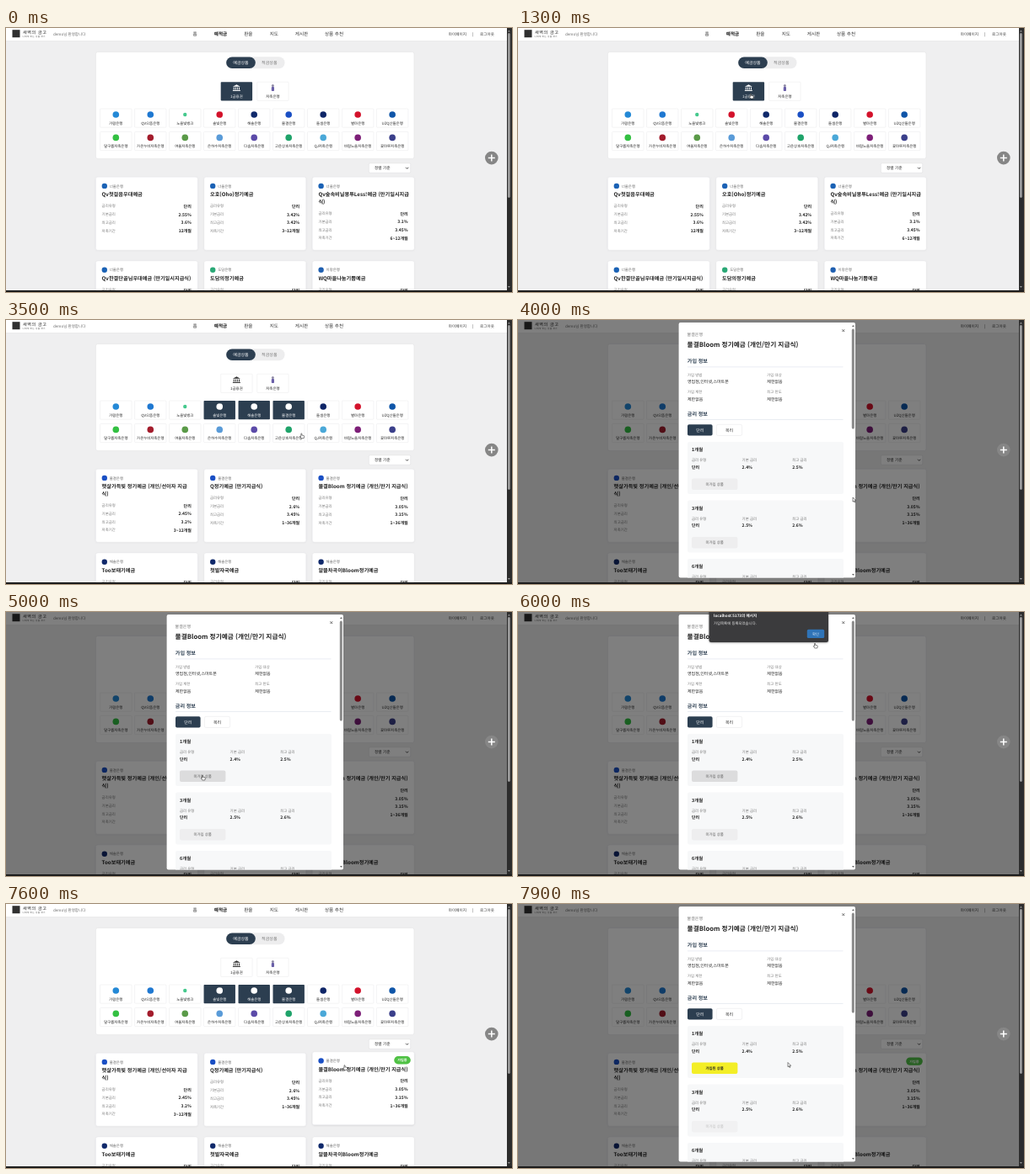
Write an HTML page that moves like this. It is 600x314 px and loops after 8 s.

```html
<!DOCTYPE html>
<html lang="ko">
<head>
<meta charset="utf-8">
<title>예적금 비교</title>
<style>
  html, body { margin: 0; width: 100%; height: 100%; overflow: hidden; background: #efeff0; }
  svg { display: block; width: 100vw; height: 100vh; }
  text {
    font-family: "Noto Sans CJK KR", "Noto Sans KR", "Noto Sans", sans-serif;
    white-space: pre; text-rendering: geometricPrecision;
  }
</style>
</head>
<body>
<svg id="stage" viewBox="0 0 600 314"></svg>
<script>
const LOOP = 8000, TICK = 100;
const NAVY = '#2c3e50', INK = '#222', GREY = '#777', LINE = '#e3e4e6';

// name, icon colour
const BANKS = [
  ['가람은행', '#2489d6'], ['QV으뜸은행', '#1f78d1'], ['노을빛뱅크', '#45c98d'],
  ['솔빛은행', '#d3122b'], ['해솔은행', '#10296b'], ['물결은행', '#1a4fc4'],
  ['들샘은행', '#0e2567'], ['별마은행', '#d3122b'], ['UZQ산들은행', '#0f55a8'],
  ['달구름저축은행', '#33c042'], ['가온누비저축은행', '#a31c2c'], ['여울저축은행', '#5a9a48'],
  ['은하수저축은행', '#5a9bd8'], ['다솜저축은행', '#5b4aa8'], ['고운상호저축은행', '#1fa36a'],
  ['QJ저축은행', '#4aa8d8'], ['바람노을저축은행', '#7d1f78'], ['꽃마루저축은행', '#3a3f8a']
];
const SOL = BANKS[3], HAE = BANKS[4], MUL = BANKS[5];
const NEO = ['너울은행', '#1b62b5'], DO = ['도담은행', '#2aa876'], IR = ['이랑은행', '#1f5fb0'];

// bank, title lines, base rate, top rate, term
const ALL = [
  [NEO, ['Qv첫걸음우대예금'], '2.55%', '3.6%', '12개월'],
  [NEO, ['오호(Oho)정기예금'], '3.42%', '3.42%', '3~12개월'],
  [NEO, ['Qv숲속비닐봉투Less!예금 (만기일시지급', '식)'], '3.1%', '3.45%', '6~12개월'],
  [NEO, ['Qv한결단골님우대예금 (만기일시지급식)'], '2.5%', '2.8%', '1~36개월'],
  [DO, ['도담의정기예금'], '2.6%', '3.4%', '1~36개월'],
  [IR, ['WQ마을나눔기쁨예금'], '2.6%', '3.5%', '12개월']
];
const SOL_CARDS = [
  [SOL, ['또(Too) 차오름 정기예금'], '3.15%', '3.35%', '6~12개월'],
  [SOL, ['또(Too) 알찬 정기예금'], '3%', '3.45%', '1~36개월'],
  [SOL, ['GLOW정기예금'], '2.75%', '3.2%', '1~36개월']
];
const HAE_CARDS = [
  [HAE, ['Too보태기예금'], '2.6%', '3.25%', '3~12개월'],
  [HAE, ['첫발자국예금'], '2.8%', '3.3%', '12개월'],
  [HAE, ['알뜰차곡이Bloom정기예금'], '2.75%', '3.4%', '1~36개월']
];
const MUL_CARDS = [
  [MUL, ['햇살가득빛 정기예금 (개인/선이자 지급', '식)'], '2.45%', '3.2%', '3~12개월'],
  [MUL, ['Q정기예금 (만기지급식)'], '2.6%', '3.45%', '1~36개월'],
  [MUL, ['물결Bloom 정기예금 (개인/만기 지급식)'], '3.05%', '3.15%', '1~36개월']
];

// start, selected bank indexes, cards, page scroll thumb length
const FILTERS = [
  [0, [], ALL, 196],
  [2000, [3], SOL_CARDS, 293],
  [2800, [3, 4], [...HAE_CARDS, ...SOL_CARDS], 196],
  [3300, [3, 4, 5], [...MUL_CARDS, ...HAE_CARDS], 196]
];

// time, x, y, hand pointer
const CURSOR = [
  [0, 612, 214], [100, 592, 210], [500, 440, 190], [900, 330, 120], [1300, 276, 78, 1],
  [1600, 276, 78, 1], [1800, 252, 106, 1], [2500, 252, 106, 1], [2600, 293.5, 111, 1],
  [3000, 293.5, 110, 1], [3200, 334, 106, 1], [3400, 334, 108, 1], [3700, 397, 211, 1],
  [4000, 397, 211], [4700, 233, 194, 1], [5900, 233, 194, 1], [6000, 352, 37, 1],
  [6300, 352, 37, 1], [6400, 356, 42], [6800, 407, 77.5], [6900, 407, 77.5],
  [7200, 416, 120], [7300, 416, 120], [7500, 404, 180, 1], [7600, 401.5, 191.5, 1],
  [7700, 401, 192], [7900, 320, 188.5], [8000, 320, 188.5]
];

const between = (t, a, b) => t >= a && t < b;
const rect = (x, y, w, h, fill, r = 0, extra = '') =>
  `<rect x="${x}" y="${y}" width="${w}" height="${h}" rx="${r}" fill="${fill}" ${extra}/>`;
const dot = (x, y, r, fill) => `<circle cx="${x}" cy="${y}" r="${r}" fill="${fill}"/>`;
const path = (d, fill, extra = '') => `<path d="${d}" fill="${fill}" ${extra}/>`;
const line = (d, color, w) => path(d, 'none', `stroke="${color}" stroke-width="${w}"`);
const border = (color, w = 0.4) => `stroke="${color}" stroke-width="${w}"`;
const move = (x, y, s) => `<g transform="translate(${x} ${y})">${s}</g>`;

// y is the optical middle of the line
const text = (s, x, y, size, fill = INK, weight = 400, anchor = 'start', extra = '') =>
  `<text x="${x}" y="${y + size * 0.37}" font-size="${size}" fill="${fill}" font-weight="${weight}" text-anchor="${anchor}" ${extra}>${s}</text>`;
const mid = (s, x, y, size, fill, weight) => text(s, x, y, size, fill, weight, 'middle');

function header() {
  const nav = [['홈', 224], ['예적금', 254.5], ['환율', 287.3], ['지도', 317.8], ['게시판', 350.5], ['상품 추천', 389]];
  return rect(0, 0, 594, 15.5, '#fff') + rect(0, 15.3, 594, 0.5, '#dedee0') +
    rect(7.5, 2.2, 9, 9, '#303030') +
    text('새벽의 금고', 20, 5.4, 5.1, INK, 500, 'start', 'letter-spacing=".6"') +
    text('나에게 맞는 상품 찾기', 19.5, 10, 2.6, '#555', 400, 'start', 'letter-spacing=".3"') +
    text('demo님 환영합니다', 56, 7.3, 4.5, '#666') +
    nav.map(([s, x], i) => mid(s, x, 7.2, 5.6, i === 1 ? '#111' : '#333', i === 1 ? 700 : 400)).join('') +
    text('마이페이지', 524.8, 7.3, 4.6, '#333') + text('|', 553, 7, 4.6, '#333') +
    text('로그아웃', 562, 7.3, 4.6, '#333');
}

function bankHouse(fill) {
  const cols = [-3.3, -1.2, 0.9, 3].map(x => rect(x - 0.4, -0.7, 1, 2.9, fill)).join('');
  return path('M-4.5-1.4 0-4 4.5-1.4z', fill) + cols + rect(-4.5, 2.6, 9, 1.1, fill);
}

const saver = dot(0, -2.7, 1.5, '#8f8aa6') + rect(-1.6, -1.1, 3.2, 4.9, '#6a5fa8', 0.8);

function button(x, y, label, icon, on) {
  return rect(x, y, 37.4, 22.2, on ? NAVY : '#fff', 0.8, on ? '' : border(LINE)) +
    move(x + 18.7, y + 7, icon) +
    mid(label, x + 18.7, y + 16.9, 4.4, on ? '#fff' : INK, 500);
}

function filterPanel(firstTier, chosen) {
  let s = rect(106.4, 28.4, 377.6, 127.2, '#fff', 2.5, border('#e2e2e4', 0.6));
  s += rect(261, 34.3, 69.5, 14, '#ededee', 7) + rect(261.2, 34.5, 34.6, 13.6, NAVY, 6.8);
  s += mid('예금상품', 278.5, 41.4, 5, '#fff', 500) + mid('적금상품', 312.3, 41.4, 5, GREY);
  s += button(254.7, 64.2, '1금융권', bankHouse(firstTier ? '#fff' : '#333'), firstTier);
  s += button(297.7, 64.2, '저축은행', saver, false);
  BANKS.forEach(([name, color], i) => {
    const on = chosen.includes(i);
    const x = 111.6 + (i % 9) * 40.98, y = i < 9 ? 96 : 123.4;
    s += button(x, y, name, dot(0, 0, i === 2 ? 2.2 : 3.8, on ? '#fff' : color), on);
  });
  s += rect(430.3, 160.8, 49.4, 11.5, '#fff', 1.5, border('#d4d4d6'));
  return s + text('정렬 기준', 437, 166.5, 4.7, INK) + line('M474 165.8l1.6 1.6 1.6-1.6', '#222', 0.8);
}

function card([bank, title, base, top, term], x, y, h, lift, joined) {
  const shift = (title.length - 1) * 8.8, gap = 9.8;
  let s = rect(0.1, 0.6, 121, h, lift ? '#d2d2d5' : '#e0e0e2', 2.8, 'filter="url(#soft)"') +
    rect(0, 0, 121, h, '#fff', 2.5, border('#e6e6e8'));
  s += dot(10.4, 10.7, 3.2, bank[1]) + text(bank[0], 16.4, 10.7, 4.4, '#666');
  title.forEach((row, i) => { s += text(row, 7.2, 20.9 + i * 8.8, 6.2, INK, 700); });
  [['금리유형', '단리'], ['기본금리', base], ['최고금리', top], ['저축기간', term]].forEach(([k, v], i) => {
    const cy = 34.4 + shift + i * gap;
    s += text(k, 7.2, cy, 4.4, GREY) + text(v, 113.4, cy + 0.3, 5, INK, 700, 'end');
  });
  if (joined) s += rect(97, 5.2, 19.6, 9.4, '#4fc144', 4.7) + mid('가입중', 106.8, 9.9, 4.1, '#fff', 700);
  return move(x, y - lift, s);
}

function page(t) {
  const [, chosen, cards] = FILTERS.findLast(f => t >= f[0]);
  const lift = t === 7500 ? 0.8 : between(t, 7600, 7700) || between(t, 3700, 4000) ? 1.4 : 0;
  const first = cards.slice(0, 3);
  const h = first.some(c => c[1].length > 1) ? 87 : 78;
  let s = rect(0, 0, 600, 314, '#efeff0') + header() + filterPanel(t < 1400, chosen);
  cards.forEach((c, i) => {
    const third = i === 2;
    s += card(c, 106.4 + (i % 3) * 128.4, i < 3 ? 177.2 : 190 + h, h, third ? lift : 0, third && t >= 6300);
  });
  return s;
}

function term(label, y, base, top, state) {
  const looks = {
    plain: ['#eeeeef', '#555', 400, '미가입 상품'],
    hover: ['#dcdcdd', '#555', 400, '미가입 상품'],
    off: ['#f1f1f2', '#bdbdbd', 400, '미가입 상품'],
    done: ['#f3ee27', '#222', 700, '가입된 상품']
  };
  const [bg, ink, weight, caption] = looks[state];
  let s = rect(0, 0, 185, 62, '#f7f8f9', 2) + text(label, 5, 9.4, 5.4, INK, 700);
  [['금리 유형', '단리'], ['기본 금리', base], ['최고 금리', top]].forEach(([k, v], i) => {
    s += text(k, 5 + i * 59.6, 21.5, 4.4, GREY) + text(v, 5 + i * 59.6, 30, 5, INK, 700);
  });
  s += rect(5, 43.5, 54.4, 13.6, bg, 2) + mid(caption, 32.2, 50.3, 4.4, ink, weight);
  return move(201, y, s);
}

function modal(t) {
  const joined = t >= 6300;
  const info = [['가입 방법', '영업점,인터넷,스마트폰', 201, 65], ['가입 대상', '제한없음', 295.3, 65],
    ['가입 제한', '제한없음', 201, 85.5], ['최고 한도', '제한없음', 295.3, 85.5]];
  let s = rect(0, 0, 594, 312, 'rgba(0,0,0,.5)') + rect(190.6, 3, 209.4, 303.4, '#fff', 2);
  s += '<g clip-path="url(#sheet)">';
  s += text('물결은행', 200.6, 17, 5, GREY) + line('M384.4 11.2l2.8 2.8m0-2.8l-2.8 2.8', '#333', 0.7);
  s += text('물결Bloom 정기예금 (개인/만기 지급식)', 200.6, 29.2, 7.7, INK, 700);
  s += text('가입 정보', 200.8, 49, 6.1, NAVY, 700) + rect(201, 55.6, 184.5, 0.6, '#dbe2ea');
  info.forEach(([k, v, x, y]) => { s += text(k, x, y, 4.4, GREY) + text(v, x, y + 8.4, 5, INK, 500); });
  s += text('금리 정보', 200.8, 112, 6.1, NAVY, 700) + rect(201, 118, 184.5, 0.6, '#dbe2ea');
  s += rect(201, 124.3, 29.6, 13.2, NAVY, 1.8) + mid('단리', 215.8, 130.9, 5, '#fff', 500);
  s += rect(235.4, 124.3, 30.2, 13.2, '#fff', 1.8, border('#dedee0')) + mid('복리', 250.6, 130.9, 5, '#333', 500);
  s += term('1개월', 145, '2.4%', '2.5%', joined ? 'done' : between(t, 4700, 6300) ? 'hover' : 'plain');
  s += term('3개월', 214.5, '2.5%', '2.6%', joined ? 'off' : 'plain');
  s += term('6개월', 284, '2.6%', '2.7%', 'plain') + '</g>';
  return s + rect(395.8, 10.4, 3, 119, '#8a8a8a', 1.5) +
    path('M396 8l1.4-2 1.4 2z', '#666') + path('M396 302l1.4 2 1.4-2z', '#666');
}

function alertBox() {
  return rect(226.6, -4, 141.4, 40.4, '#222', 3, 'filter="url(#soft)" opacity=".5"') +
    rect(226.6, -4, 141.4, 40, '#3b3b3d', 2.5) +
    text('localhost:5173의 메시지', 232, 4.2, 4.6, '#fff', 700) +
    text('가입목록에 등록되었습니다.', 232, 13.2, 4.4, '#e8e8e8') +
    rect(342.8, 20.8, 20.4, 10.2, '#2f74b8', 1.6) + mid('확인', 353, 25.9, 4.4, '#d8e8f8');
}

function frameEdges(t) {
  const thumb = FILTERS.findLast(f => t >= f[0])[3];
  return rect(594, 0, 6, 314, '#2c2c2c') + rect(0, 312, 600, 2, '#1c1c1c') +
    path('M595 4.4l1.4-2 1.4 2z', '#9b9b9b') + path('M595 307l1.4 2 1.4-2z', '#9b9b9b') +
    rect(595, 6, 2.8, thumb, '#9b9b9b', 1.4);
}

function cursor(t) {
  const i = CURSOR.findLastIndex(k => t >= k[0]);
  const a = CURSOR[i], b = CURSOR[i + 1];
  const p = (t - a[0]) / (b[0] - a[0]), e = p * p * (3 - 2 * p);
  const hand = 'M-.5 3.2V.5Q0-.3.5.5V2.3L3 2.9Q3.5 3.1 3.3 4L2.8 6H-.1L-1.8 3.7Q-1.4 2.9-.5 3.7z';
  const arrow = 'M0 0V5.2L1.2 4.2 2 6 2.9 5.6 2.1 3.8H3.7z';
  return move(a[1] + (b[1] - a[1]) * e, a[2] + (b[2] - a[2]) * e,
    path(a[3] ? hand : arrow, '#fff', border('#111', 0.5)));
}

const DEFS = '<defs><filter id="soft" x="-10%" y="-10%" width="120%" height="120%"><feGaussianBlur stdDeviation="1"/></filter>' +
  '<clipPath id="sheet"><rect x="190.6" y="3" width="209.4" height="303.4" rx="2"/></clipPath></defs>';

function draw(t) {
  const open = between(t, 4000, 7000) || t >= 7700;
  return DEFS + page(t) + (open ? modal(t) : '') +
    dot(575.8, 154.6, 7.8, '#868686') + line('M571.8 154.6h8m-4-4v8', '#fff', 1.5) +
    (between(t, 6000, 6300) ? alertBox() : '') + frameEdges(t) + cursor(t);
}

const stage = document.getElementById('stage');
const start = performance.now();
let shown = -1;
function loop() {
  const t = Math.floor(((performance.now() - start) % LOOP) / TICK) * TICK;
  if (t !== shown) stage.innerHTML = draw(shown = t);
  requestAnimationFrame(loop);
}
loop();
</script>
</body>
</html>
```
